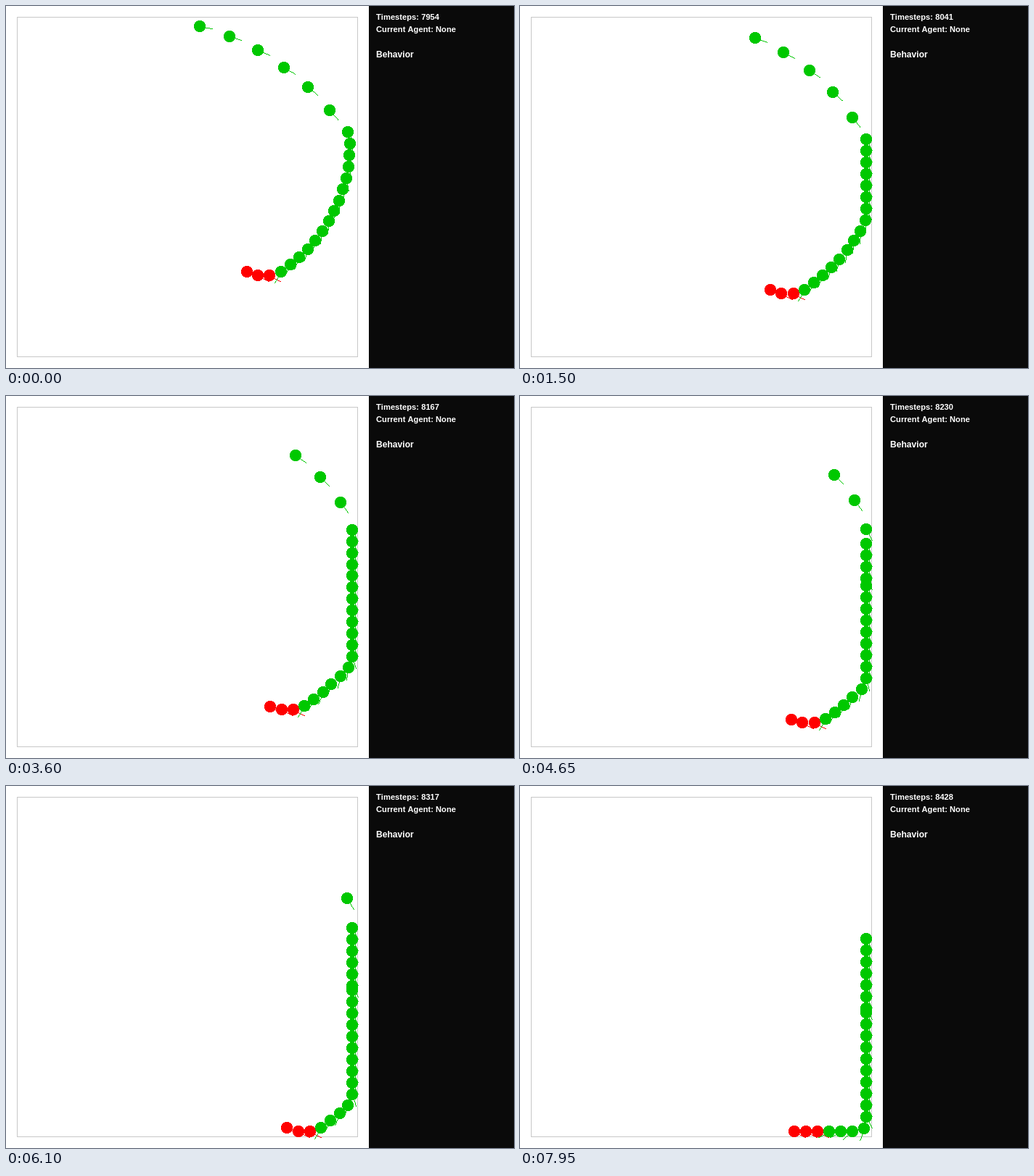
An HTML page with a canvas for the animation above (8000 ms loop, 700x500 px).

```html
<!DOCTYPE html>
<html>
<head>
<meta charset="utf-8">
<style>
  html, body { margin: 0; overflow: hidden; background: #fff; }
  canvas { display: block; }
</style>
</head>
<body>
<canvas id="stage" width="700" height="500"></canvas>
<script>
const ctx = document.getElementById('stage').getContext('2d');
const LOOP = 8000, TICK = 50;
const WALL = 477, RADIUS = 8, SIZE = 2 * RADIUS, LINE = 17;
const RUNNERS = 7, CORNER = 18, FIRST_RED = 22;
const SPEED = 2.03;

const clamp = (v, lo, hi) => Math.max(lo, Math.min(hi, v));
const rad = degrees => degrees * Math.PI / 180;

// Points one stride apart, turning by the given bearing.
function walk(x, y, count, stride, bearing) {
  const points = [];
  for (let k = 0; k < count; k++) {
    points.push({ x, y });
    x += stride * Math.cos(rad(bearing(k)));
    y += stride * Math.sin(rad(bearing(k)));
  }
  return points;
}

// Spaced-out runners first, then the touching chain with its curled tail.
const starts = [
  ...walk(267, 28, RUNNERS, 43.3, k => 19 + 7 * k),
  ...walk(474, 190, 17, 16.1, k => 92 + 4.4 * k + 13 * Math.max(0, k - 12)),
];

// Runners steer ever more sharply; each is 20 steps ahead of the one behind.
function runner(id, n) {
  const heading = step => {
    const t = step + 20 * (id - 1);
    return 11 + 0.3 * t + 6.5e-6 * t ** 3;
  };
  let { x, y } = starts[id - 1];
  for (let step = 0; step < n; step++) {
    const a = rad(Math.min(90, heading(step + 0.5)));
    x += SPEED * Math.cos(a);
    y += SPEED * Math.sin(a);
  }
  return { x: Math.min(x, WALL), y, angle: Math.min(62, heading(n)) };
}

// The chain drifts down and right until the wall or the floor stops it.
function link(id, n) {
  const start = starts[id - 1];
  const lead = Math.max(0, CORNER - id);
  const freeX = start.x + (0.46 + 0.026 * lead) * (lead ? n : Math.min(n, 121));
  const freeY = start.y + Math.min(0.95, 0.868 + 0.018 * lead) * n;
  let x = Math.min(freeX, WALL);
  if (!lead) {
    const rest = 474 - SIZE * (id - CORNER);
    x += (rest - x) * clamp((n - 125) / 33, 0, 1);
  }
  let angle = 30;
  if (id < FIRST_RED) {
    angle = 77 + 4 * (id - 10);
    if (freeX > WALL) angle = Math.max(62, angle - 4 * (freeX - WALL));
    else if (freeY > WALL) angle = Math.min(150, angle + 4 * (freeY - WALL));
  }
  return { x, y: Math.min(freeY, WALL), angle };
}

// Built from the tail upwards, each agent resting on the one below.
// The last runner is slowly pressed down onto the chain.
function pose(n) {
  const agents = [];
  for (let id = starts.length; id >= 1; id--) {
    const agent = id <= RUNNERS ? runner(id, n) : link(id, n);
    if (id < CORNER) {
      const below = agents[agents.length - 1];
      const dx = below.x - agent.x;
      const press = id === RUNNERS ? 10 * clamp((n - 65) / 45, 0, 1) : 0;
      const gap = Math.sqrt(Math.max(0, SIZE * SIZE - dx * dx)) - press;
      agent.y = Math.min(agent.y, below.y - gap);
    }
    agent.color = id < FIRST_RED ? '#00c800' : '#f00';
    agents.push(agent);
  }
  return agents;
}

// Hard-edged disc and heading line, without smoothing.
function drawAgent({ x, y, angle, color }) {
  const cx = Math.round(x), cy = Math.round(y);
  ctx.fillStyle = color;
  for (let row = -RADIUS; row < RADIUS; row++) {
    const half = Math.round(Math.sqrt(RADIUS ** 2 - (row + 0.5) ** 2));
    ctx.fillRect(cx - half, cy + row, 2 * half, 1);
  }
  const dx = LINE * Math.cos(rad(angle)), dy = LINE * Math.sin(rad(angle));
  const steps = Math.round(Math.max(Math.abs(dx), Math.abs(dy)));
  for (let s = 0; s <= steps; s++) {
    ctx.fillRect(cx + Math.round(dx * s / steps), cy + Math.round(dy * s / steps), 1, 1);
  }
}

function label(text, y, size) {
  ctx.font = `bold ${size}px "Liberation Sans", Arial, sans-serif`;
  ctx.fillText(text, 510, y);
}

function draw(now) {
  const n = Math.max(0, Math.floor((now % LOOP) / TICK) - 1);
  ctx.fillStyle = '#fff';
  ctx.fillRect(0, 0, 500, 500);
  ctx.strokeStyle = '#c8c8c8';
  ctx.strokeRect(15.5, 15.5, 469, 469);
  pose(n).forEach(drawAgent);

  ctx.fillStyle = '#0a0a0a';
  ctx.fillRect(500, 0, 200, 500);
  ctx.fillStyle = '#fff';
  ctx.fontKerning = 'none';
  label(`Timesteps: ${7954 + 3 * n}`, 19, 11.2);
  label('Current Agent: None', 36, 11.2);
  label('Behavior', 71, 12.1);
}

const start = performance.now();
function frame() {
  draw(performance.now() - start);
  requestAnimationFrame(frame);
}
frame();
</script>
</body>
</html>
```
